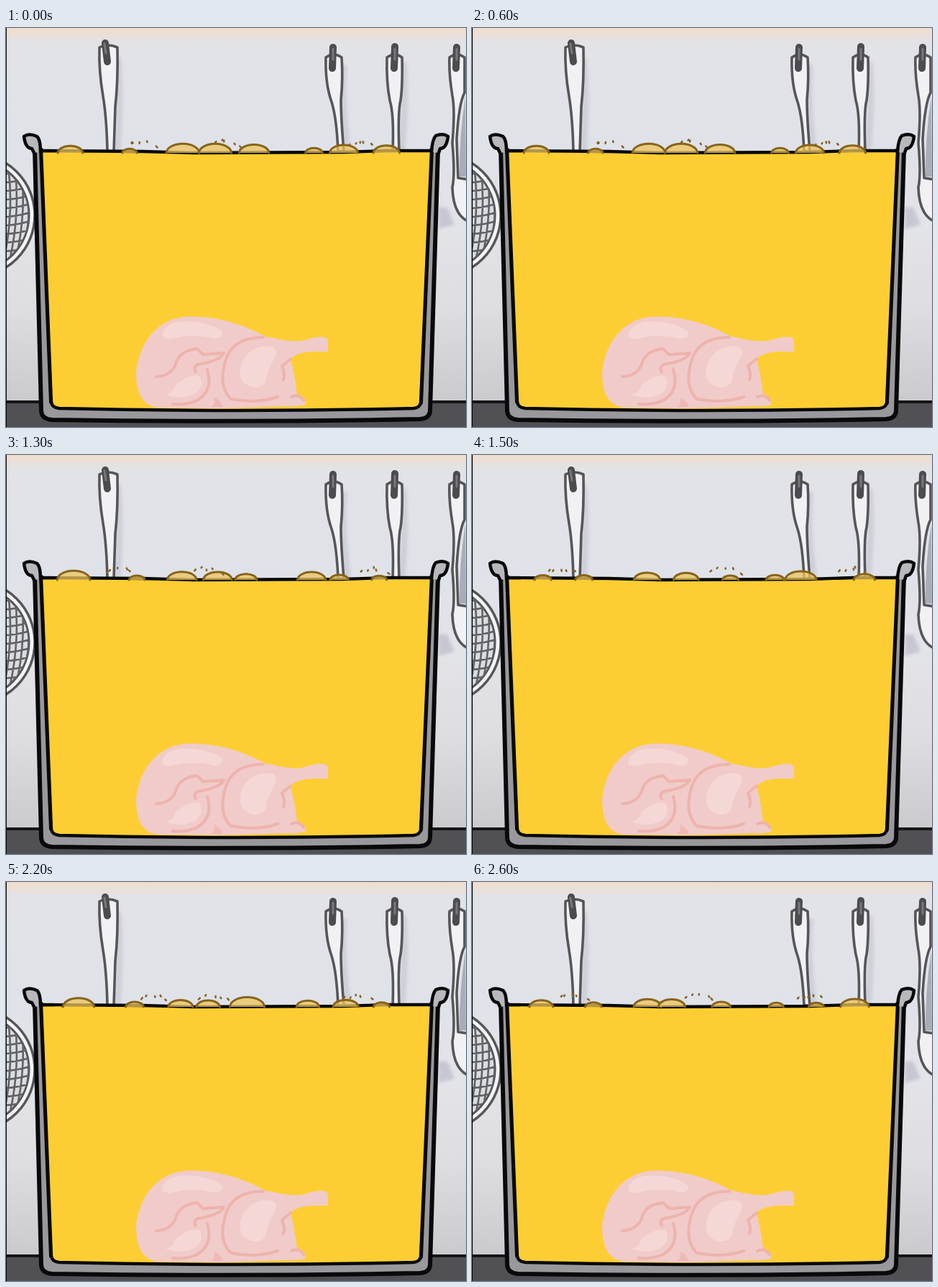
Write an HTML page that moves like this. It is 640 px wide and 556 px high and loops after 2700 ms.

```html
<!DOCTYPE html>
<html lang="en">
<head>
<meta charset="utf-8">
<title>Boiling pot</title>
<style>
html, body { margin: 0; height: 100%; overflow: hidden; }
svg { display: block; }
path, circle { stroke-linecap: round; stroke-linejoin: round; }
.tool { fill: #f1f1f4; stroke: #56565a; stroke-width: 3.6; }
.hook { fill: none; stroke: #4c4c50; stroke-width: 10; }
.shade { fill: none; stroke: #bfc0ca; stroke-width: 9; opacity: .55; }
.crease { fill: none; stroke: #eeb3ad; stroke-width: 4; }
.shine { fill: #f5d8d5; }
.bubble { fill: #eec55c; fill-opacity: .75; stroke: #87641b; stroke-width: 3; }
.speck { fill: none; stroke: #86642c; stroke-width: 2.6; }
</style>
</head>
<body>
<svg width="640" height="556" viewBox="0 0 640 556">
  <defs>
    <linearGradient id="wall" x2="0" y2="1">
      <stop offset="0" stop-color="#f1dccb"/>
      <stop offset=".035" stop-color="#e2e3e7"/>
      <stop offset=".3" stop-color="#dfe2e8"/>
      <stop offset=".5" stop-color="#e3e4e8"/>
      <stop offset=".7" stop-color="#dedde1"/>
      <stop offset=".94" stop-color="#cacace"/>
    </linearGradient>
    <filter id="soft"><feGaussianBlur stdDeviation="2"/></filter>
    <clipPath id="mesh"><circle cx="-46" cy="261" r="78"/></clipPath>
  </defs>

  <rect width="640" height="556" fill="url(#wall)"/>
  <path d="M602 250h12l10 24-22 6z" fill="#c6c7d3" filter="url(#soft)"/>
  <rect y="521" width="640" height="35" fill="#515054"/>
  <path d="M0 521H640" stroke="#151515" stroke-width="4"/>

  <g filter="url(#soft)">
    <path class="shade" d="M156 45Q160 100 155 168M470 55Q466 100 475 168M553 50Q557 100 551 168"/>
  </g>
  <path class="tool" d="M130 27Q142 21 155 27Q156 75 152 110L150 172H141Q140 125 135 95Q129 60 130 27Z"/>
  <path class="tool" d="M445 41Q456 33 467 41Q469 70 466 100Q466 125 470 172H462Q460 125 453 103Q444 78 445 41Z"/>
  <path class="tool" d="M530 41Q541 33 551 41Q552 80 549 101Q545 115 547 172H538Q540 120 534 101Q529 75 530 41Z"/>
  <path class="tool" d="M617 41Q627 33 638 41V90Q630 105 627 155L629 209L642 211V269Q622 259 621 222Q625 205 621 160Q625 115 621 94Q616 64 617 41Z"/>
  <path d="M639 96Q630 155 631 207H640Z" fill="#aaacb8"/>
  <path class="hook" d="M138 21L141 47M455 27L454 56M541 26L540 56M627 27L626 56"/>
  <path d="M137 22L139 35M455 29V44M541 29V44M627 29V44" stroke="#77777c" stroke-width="3"/>

  <circle cx="-46" cy="261" r="86" fill="#f4f4f5" stroke="#55565a" stroke-width="3.5"/>
  <circle cx="-46" cy="261" r="78" fill="#dadce0" stroke="#55565a" stroke-width="3"/>
  <path id="net" clip-path="url(#mesh)" fill="none" stroke="#616267" stroke-width="2.6"/>

  <path d="M40 170L49 534Q50 545 64 546Q320 550 576 545Q589 544 590 534L601 170H592L577 522L63 521L49 170Z" fill="#99989d" stroke="#090909" stroke-width="6"/>
  <path d="M49 171L190 172L260 174L470 173L530 171H592L577 522Q576 529 567 530Q320 536 74 530Q64 529 63 521Z" fill="#fdce33" stroke="#090909" stroke-width="4.4"/>
  <path d="M39 174L36 168Q27 168 25 151Q32 146 43 151Q48 155 48 173M602 174L604 168Q613 168 615 151Q608 146 598 150Q593 155 592 173" fill="#b7b7bc" stroke="#090909" stroke-width="4.5"/>

  <path d="M181 480C185 438 212 402 256 402C298 402 332 414 361 430C385 434 401 441 425 432Q447 427 448 436V451H426Q407 451 396 461Q401 480 405 510Q419 515 416 525Q405 528 390 527L300 530L214 529Q181 528 181 480Z" fill="#f0cbc9"/>
  <path class="shine" d="M217 428Q221 411 245 409Q280 408 301 423Q303 432 290 433Q263 425 229 433Q217 434 217 428Z"/>
  <path class="shine" d="M328 491C318 464 344 437 372 445C384 454 364 468 362 490C359 504 338 504 328 491Z"/>
  <path class="shine" d="M222 511Q233 509 236 497Q259 480 270 486Q276 500 263 510Q244 519 222 511Z"/>
  <path class="crease" d="M209 486Q229 485 236 469Q241 449 266 447L274 455L303 453Q298 464 266 469Q260 474 264 479M280 476Q289 505 266 519Q250 526 232 524"/>
  <path class="crease" d="M358 431Q314 431 305 465Q295 500 313 517Q350 524 378 514M396 461L384 471Q389 482 386 490M397 514Q408 509 414 519"/>
  <path d="M286 528Q291 524 290 515Q299 519 302 528Z" fill="#efb9b4"/>

  <g id="boil"></g>
  <path d="M.5 0V556" stroke="#080808"/>
</svg>
<script>
const LOOP = 2700, STEP = 100, POSES = 6;
const BUBBLES = 8, SPLASHES = 3, SPECKS = 5;
const LEFT = 75, SPAN = 490, SURFACE = 174;

const range = (n, make) => Array.from({ length: n }, (_, i) => make(i)).join('');

function seeded(seed) {
  return () => (seed = seed * 16807 % 2147483647) / 2147483647;
}

function bubble(x, width) {
  const r = width / 2;
  return `<path class="bubble" d="M${x - r} ${SURFACE}A${r} ${width * .28} 0 0 1 ${x + r} ${SURFACE}"/>`;
}

// Specks fly outwards along an arch above the surface.
function splash(x, random) {
  const d = range(SPECKS, i => {
    const u = (i + random()) / SPECKS - .5;
    const y = 155 + 28 * u * u + 5 * random();
    return `M${x + 44 * u} ${y}l${4 * u} ${1 + random()}`;
  });
  return `<path class="speck" d="${d}"/>`;
}

function boilPose(index) {
  const random = seeded(7919 * (index + 1));
  const spread = (i, n) => LEFT + SPAN * (i + .2 + .6 * random()) / n;
  return range(BUBBLES, i => bubble(spread(i, BUBBLES), 20 + 28 * random() ** 1.5)) +
    range(SPLASHES, i => splash(spread(i, SPLASHES), random));
}

const poses = Array.from({ length: POSES }, (_, i) => boilPose(i));

document.getElementById('net').setAttribute('d',
  range(13, i => `M-4 ${191 + i * 12}q24 0 48 -10`) +
  range(5, i => `M${2 + i * 9} 184Q${13 + i * 9} 260 ${i * 8 - 6} 336`));

const boil = document.getElementById('boil');
let shown = -1;
function draw() {
  const step = Math.floor(performance.now() % LOOP / STEP);
  // 28 poses are spread over the 27 steps of a loop.
  const pose = Math.floor(step * 28 / 27 + .6) % POSES;
  if (pose !== shown) boil.innerHTML = poses[shown = pose];
  requestAnimationFrame(draw);
}
draw();
</script>
</body>
</html>
```
